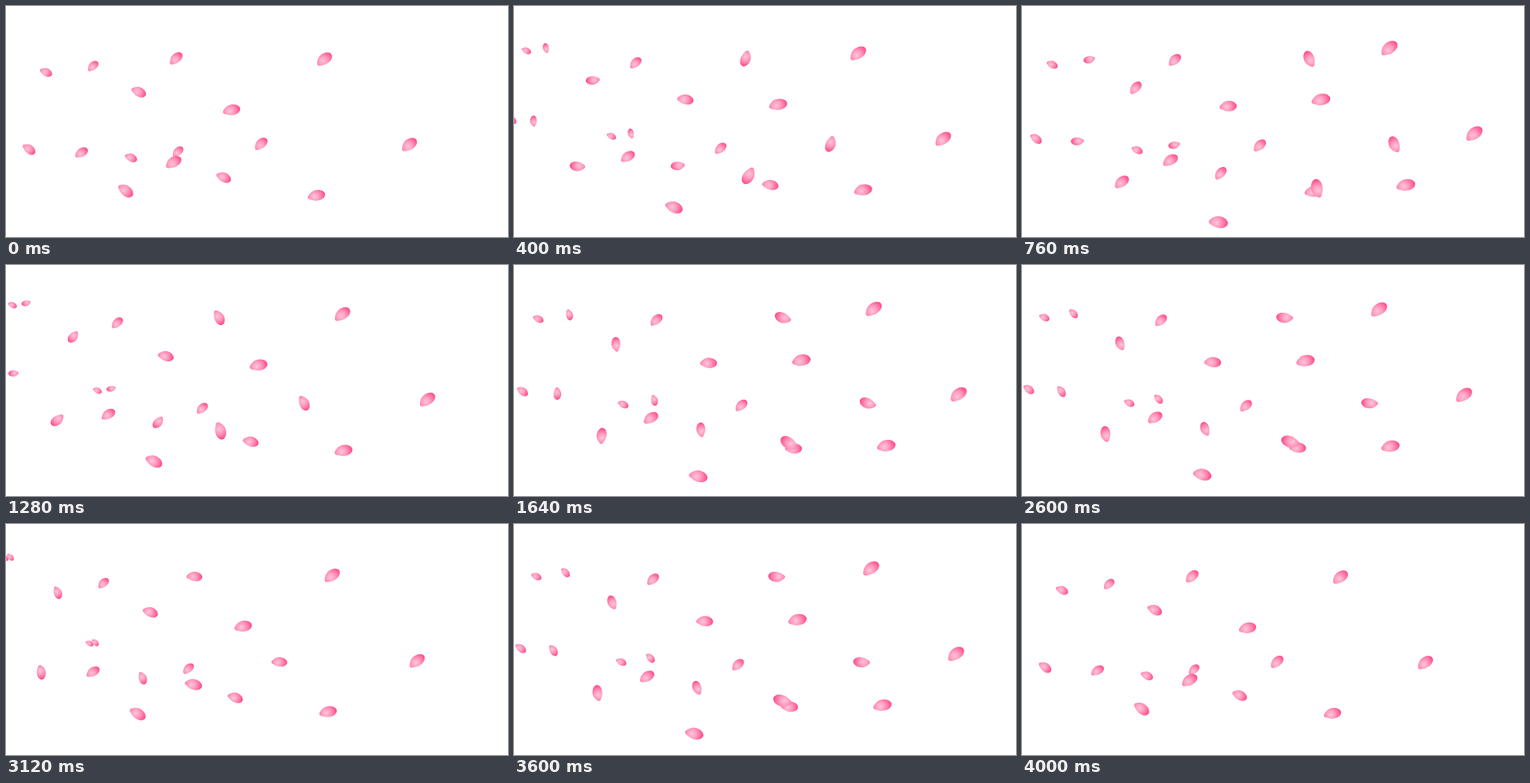
An HTML page with a canvas for the animation above (4040 ms loop, 650x300 px).

```html
<!DOCTYPE html>
<html lang="en">
<head>
<meta charset="utf-8">
<title>Drifting petals</title>
<style>
html, body { margin: 0; width: 100%; height: 100%; overflow: hidden; background: #fff; }
canvas { display: block; width: 650px; height: 300px; }
</style>
</head>
<body>
<canvas id="stage" width="650" height="300"></canvas>
<script>
const ctx = document.getElementById('stage').getContext('2d');
const STEP = 40, FRAMES = 101, CYCLE = 25, SPAN = 24;
const rad = deg => deg * Math.PI / 180;
const lerp = (a, b, k) => a + (b - a) * k;
const clamp01 = v => Math.min(1, Math.max(0, v));

// A flight has four legs between its points; spins lists full turns per leg
const flights = [
  { points: [[-9.5, 38], [52, 86], [172, 111.5], [292, 135], [412, 118]],
    tilt: 23, swing: -37, spins: [0, 1, 0, 0] },
  { points: [[-9.5, 38], [112.5, 78], [220, 68], [412, 69], [492, 51]],
    tilt: -45, swing: 5, spins: [2, 0, 1, 0] }
];

// Each spray repeats the flights with its own placement
const sprays = [
  { x: 0, y: 0, scale: 1, turn: 0, legs: 4 },
  { x: 110, y: 111, scale: 1, turn: 0, legs: 4 },
  { x: -7.9, y: 81, scale: 1.11, turn: 11.3, legs: 3 }
];

// Petal 21 long, head to the right
const petal = new Path2D(
  'M-10.3 -1 C-8.5 -3 -6 -5.6 -1.5 -6.4 C4 -6.9 9 -4.5 10.4 -.5 ' +
  'C11 2.5 8.5 5.6 4 6.3 C0 6.8 -4 6 -6.5 4.2 C-7.8 3.4 -9.5 2.8 -10.2 1.8 ' +
  'C-10.8 .8 -10.8 -.2 -10.3 -1 Z');
const tint = ctx.createRadialGradient(-2.5, 0.8, 0, -2.5, 0.8, 12.5);
tint.addColorStop(0, '#ffc4da');
tint.addColorStop(0.4, '#ff9fc1');
tint.addColorStop(0.75, '#ff70a3');
tint.addColorStop(1, '#ff4a8a');

const sizeAt = leg => (10 + 6.3 * leg ** 0.6) / 20.6;

function drawPetal({ points, tilt, swing, spins }, leg, k) {
  const [from, to] = [points[leg], points[leg + 1]];
  const size = lerp(sizeAt(leg), sizeAt(leg + 1), k);
  const heading = tilt + swing * clamp01(leg + k - 2) + 360 * spins[leg] * k;
  ctx.save();
  ctx.translate(lerp(from[0], to[0], k), lerp(from[1], to[1], k));
  ctx.rotate(rad(heading));
  ctx.scale(size, size);
  ctx.fillStyle = tint;
  ctx.fill(petal);
  ctx.restore();
}

function drawSpray({ x, y, scale, turn, legs }, phase) {
  ctx.save();
  ctx.translate(x, y);
  ctx.rotate(rad(turn));
  ctx.scale(scale, scale);
  for (const flight of flights) {
    for (let leg = 0; leg < legs; leg++) {
      const unborn = leg === 0 && phase === 0;
      const gone = leg === 3 && phase === SPAN;
      if (!unborn && !gone) drawPetal(flight, leg, phase / SPAN);
    }
  }
  ctx.restore();
}

const start = performance.now();
function render(now) {
  const frame = Math.floor(Math.max(0, now - start) / STEP) % FRAMES;
  ctx.fillStyle = '#fff';
  ctx.fillRect(0, 0, 650, 300);
  for (const spray of sprays) drawSpray(spray, frame % CYCLE);
  requestAnimationFrame(render);
}
render(start);
</script>
</body>
</html>
```
